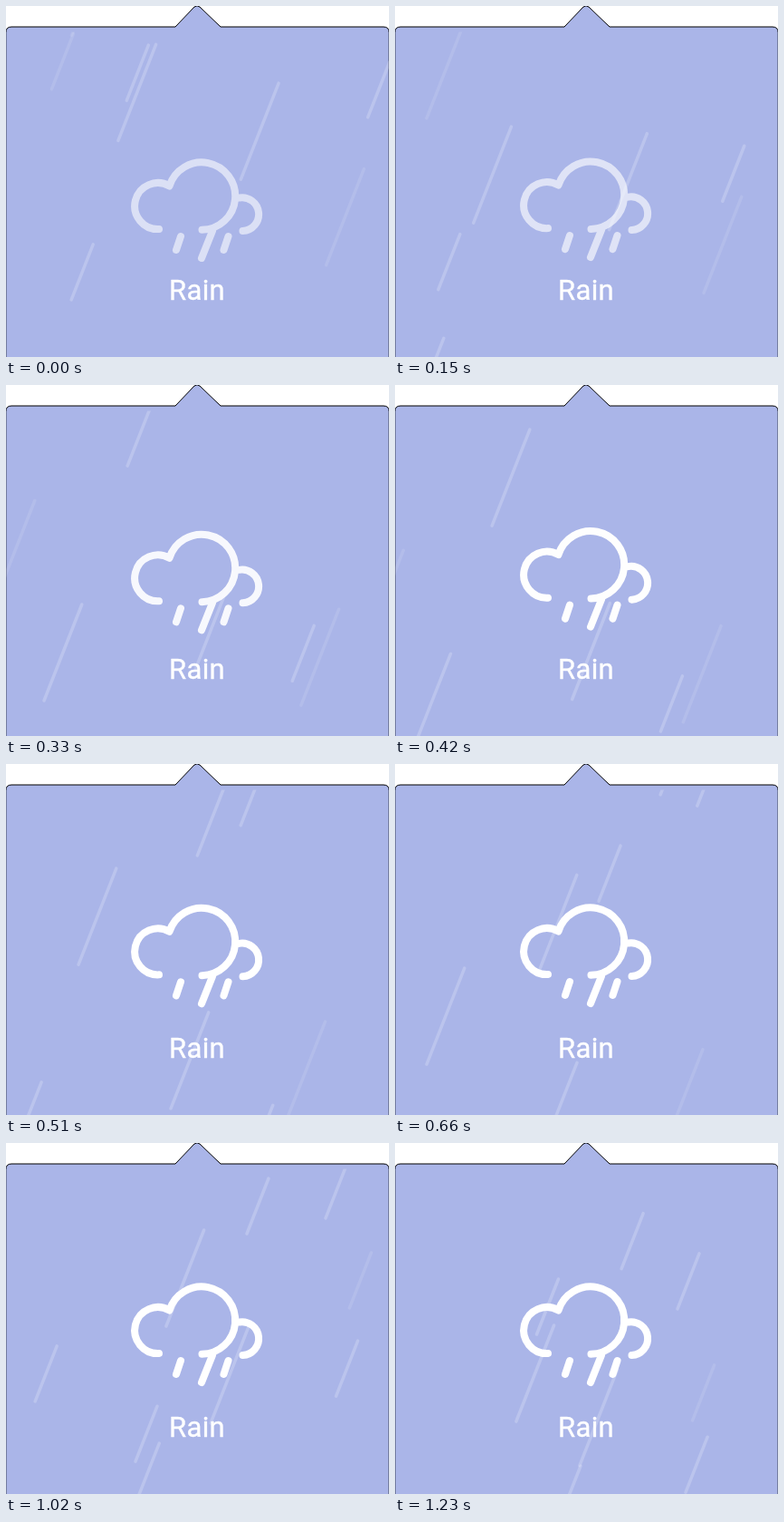
These frames come from a looping animation (423x387 px, 1260 ms). An HTML page:

```html
<!DOCTYPE html>
<html lang="en">
<head>
<meta charset="utf-8">
<title>Rain</title>
<style>
  html, body { margin: 0; width: 100%; height: 100%; overflow: hidden; background: #fff; }
  svg { display: block; }
  text { font: 31px Roboto, sans-serif; letter-spacing: .4px; fill: #fff; stroke: #fff; stroke-width: .4px; }
</style>
</head>
<body>
<svg width="423" height="387" viewBox="0 0 423 387" fill="none" stroke-linecap="round" stroke-linejoin="round">
  <clipPath id="sky"><rect y="28.5" width="423" height="358.5"/></clipPath>
  <path fill="#aab5e8" stroke="#000" d="M-.2 387.2V29.500Q-.2 23 6 23H187L208 1Q211 -1.500 214 1L237 23H417Q423.2 23 423.2 29.500V387.2Z"/>
  <g id="rain" clip-path="url(#sky)" stroke="#fff" stroke-width="3.5"></g>
  <g id="cloud" stroke="#fff" stroke-width="8">
    <path d="M169 232A25.5 25.5 0 1 1 180.5 184.5A37.2 37.2 0 1 1 216.5 232.8"/>
    <path d="M257.5 197.5A18.4 18.4 0 1 1 261.5 234"/>
    <path d="M193 240L188 255M228 234L216 264M245.5 240L240.5 255"/>
  </g>
  <text x="211" y="324" text-anchor="middle">Rain</text>
</svg>
<script>
const LOOP = 1260, STEP = 30;
const LEAN = 0.394, WIND = 0.41; // sideways px per px of height: the streak, its fall

// each drop: x where it enters at the top, when (ms), speed (px per ms)
const layers = [
  { height: 106, opacity: .2, drops: [
    [336, -230, .37], [183, -70, .605], [169, 353, .733], [251, 516, .85],
    [351, 742, .73], [258, 828, .5], [348, 1074, 1.6]] },
  { height: 61, opacity: .2, drops: [
    [204, -381, .69], [449, -100, .617], [175, -31, 1.39], [286, 498, .556], [478, 588, .505],
    [148, 709, .72], [305, 719, 1.1], [306, 808, .184], [386, 974, .476], [242, 1080, 1]] },
  { height: 106, opacity: .1, drops: [[469, -876, .205], [84, 121, .61]] },
  { height: 61, opacity: .1, drops: [[87, -22, 1.39], [453, 815, .59]] }
];

const drops = layers.flatMap(({ height, opacity, drops }) => drops.map(([x, enter, speed]) => {
  const line = document.createElementNS("http://www.w3.org/2000/svg", "path");
  line.setAttribute("d", `M${x} 0l${-height * LEAN} ${height}`);
  line.setAttribute("stroke-opacity", opacity);
  rain.append(line);
  return { line, enter, speed };
}));

// 0 to 1, smooth at both ends
const ease = (t, delay, duration) => {
  const u = Math.max(0, Math.min(1, (t - delay) / duration));
  return (1 - Math.cos(Math.PI * u)) / 2;
};

function draw(now) {
  const t = Math.floor(now % LOOP / STEP) * STEP;
  for (const { line, enter, speed } of drops) {
    const y = (t - enter) * speed;
    line.setAttribute("transform", `translate(${-y * WIND} ${y})`);
  }
  cloud.setAttribute("transform", `translate(0 ${14 * (1 - ease(t, 70, 490))})`);
  cloud.setAttribute("opacity", .58 + .42 * ease(t, 70, 370));
}

const start = performance.now();
function tick() {
  draw(performance.now() - start);
  requestAnimationFrame(tick);
}
tick();
</script>
</body>
</html>
```
